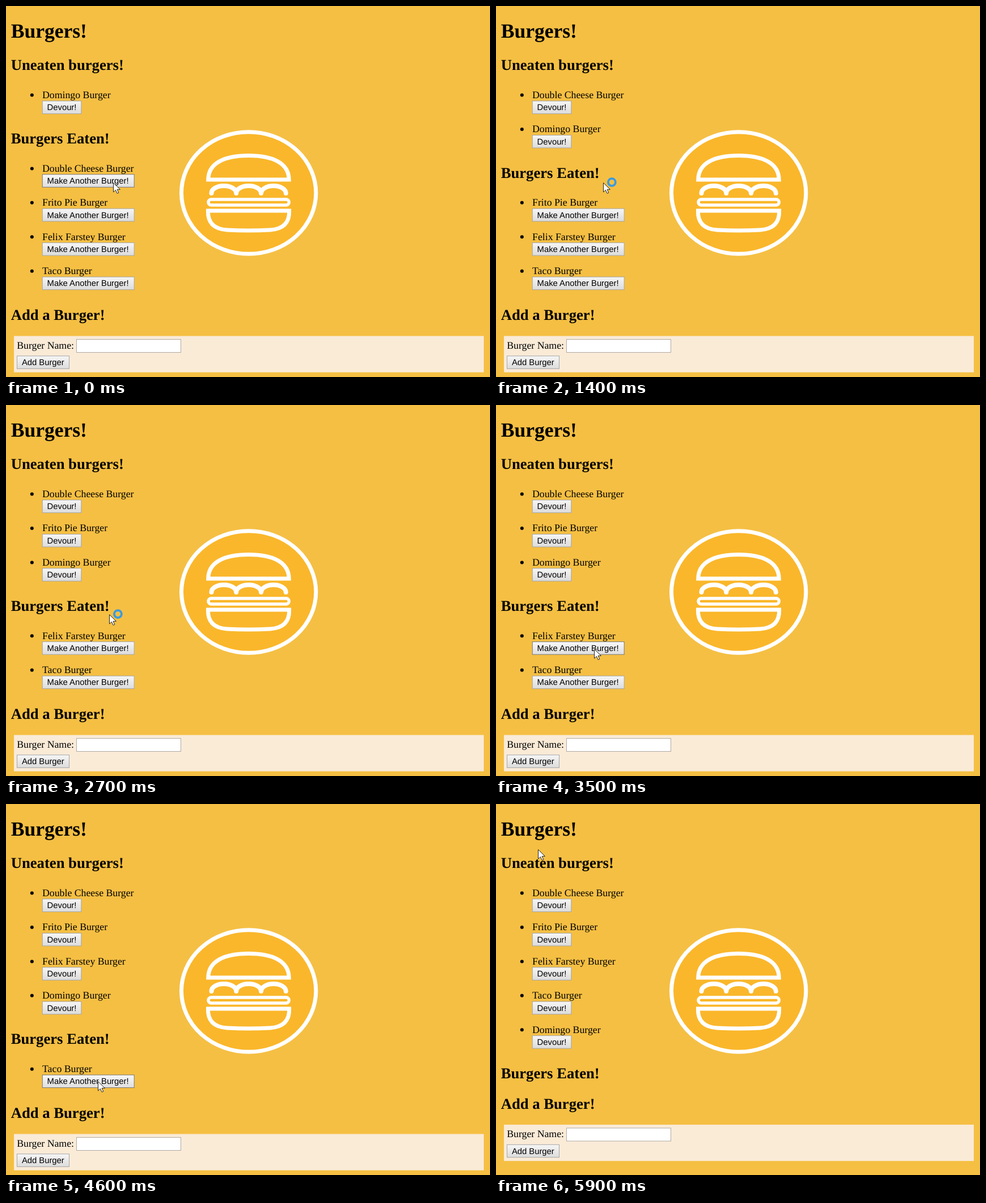
These frames come from a looping animation (854 px wide and 656 px high, 6600 ms). An HTML page:

```html
<!DOCTYPE html>
<html lang="en">
<head>
<meta charset="utf-8">
<title>Burgers!</title>
<style>
  html, body { margin: 0; width: 100%; height: 100%; overflow: hidden; background: #f5bf43; }
  svg { display: block; }
  text { font: 17.78px "Liberation Serif", "Times New Roman", serif; text-rendering: geometricPrecision; white-space: pre; }
  .h1 { font-size: 35.55px; font-weight: bold; }
  .h2 { font-size: 26.67px; font-weight: bold; }
  .label { font: 14.81px "Liberation Sans", Arial, sans-serif; }
  .icon { fill: none; stroke: #fff; stroke-width: 7; }
</style>
</head>
<body>
<svg width="854" height="656" viewBox="0 0 854 656">
  <defs>
    <linearGradient id="idle" x2="0" y2="1"><stop stop-color="#f6f6f6"/><stop offset="1" stop-color="#dcdcdc"/></linearGradient>
    <linearGradient id="hover" x2="0" y2="1"><stop stop-color="#f8f8f8"/><stop offset="1" stop-color="#dfdfdf"/></linearGradient>
    <linearGradient id="down" x2="0" y2="1"><stop stop-color="#dcdcdc"/><stop offset="1" stop-color="#f3f3f3"/></linearGradient>
  </defs>
  <rect width="854" height="656" fill="#f5bf43"/>
  <g class="icon">
    <ellipse cx="428.2" cy="330.5" rx="118.7" ry="107.8" fill="#fab72b"/>
    <path d="M356.8 307C357 278 385 264.5 428 264.5S499 278 499.3 307Z"/>
    <path d="M362.5 331a21.9 13 0 0 1 43.8 0a21.9 13 0 0 1 43.8 0a21.9 13 0 0 1 43.8 0" stroke-width="8" stroke-linecap="round" stroke-linejoin="round"/>
    <rect x="357" y="342" width="142.4" height="10" rx="5" stroke-width="5.4"/>
    <path d="M356.5 362H499.7C500.5 384 488 394.5 466 396Q428 398 390 396C368 394.5 355.7 384 356.5 362Z"/>
  </g>
  <g id="page"></g>
  <g id="cursor"></g>
</svg>
<script>
const LOOP = 6600, PITCH = 60.42, GAP = 69.4;
const eatenFirst = ["Double Cheese", "Frito Pie", "Felix Farstey", "Taco"];
const ownBurger = "Domingo";

// time, uneaten count, pointer x, y, pointer kind, state of the top eaten button
const steps = [
  [0, 1, 189, 312, "arrow", "hover"],
  [800, 1, 189, 312, "arrow", "down"],
  [900, 1, 189, 312, "arrow", "hover"],
  [1200, 1, 189, 312, "busy", "hover"],
  [1400, 2, 189, 312, "busy", "idle"],
  [1800, 2, 188, 322, "arrow", "idle"],
  [1900, 2, 185, 350, "arrow", "idle"],
  [2000, 2, 182, 370, "arrow", "hover"],
  [2100, 2, 182, 370, "arrow", "down"],
  [2200, 2, 182, 370, "arrow", "hover"],
  [2300, 2, 182, 370, "busy", "hover"],
  [2700, 3, 182, 370, "busy", "idle"],
  [2900, 3, 182, 370, "arrow", "idle"],
  [3000, 3, 181, 377, "arrow", "idle"],
  [3100, 3, 179, 392, "arrow", "idle"],
  [3200, 3, 176, 410, "arrow", "idle"],
  [3300, 3, 174, 424, "arrow", "hover"],
  [3400, 3, 173, 429, "arrow", "hover"],
  [3500, 3, 173, 431, "arrow", "hover"],
  [3800, 3, 173, 431, "arrow", "down"],
  [3900, 3, 173, 431, "arrow", "hover"],
  [4000, 4, 173, 431, "busy", "idle"],
  [4100, 4, 167, 465, "arrow", "idle"],
  [4200, 4, 162, 490, "arrow", "hover"],
  [4400, 4, 162, 490, "arrow", "down"],
  [4600, 4, 162, 490, "arrow", "hover"],
  [5000, 5, 116, 369, "beam", "idle"],
  [5100, 5, 74, 127, "arrow", "idle"],
  [5400, 5, 70, 105, "beam", "idle"],
  [5500, 5, 66, 72, "arrow", "idle"],
  [5600, 5, 65, 64, "beam", "idle"],
  [5700, 5, 66, 66, "arrow", "idle"],
  [5800, 5, 71, 75, "arrow", "idle"],
  [5900, 5, 74, 80, "arrow", "idle"]
];

const text = (x, y, str, cls = "") => `<text x="${x}" y="${y}" class="${cls}">${str}</text>`;

const box = (x, y, w, h, fill, stroke) =>
  `<rect x="${x + .5}" y="${y + .5}" width="${w - 1}" height="${h - 1}" fill="${fill}" stroke="${stroke}"/>`;

const button = (x, y, w, str, state = "idle") =>
  box(x, y, w, 23.5, `url(#${state})`, state === "idle" ? "#a6a6a6" : "#777") +
  text(x + 8.9, y + 16.9, str, "label");

const item = (y, name, btn) =>
  `<circle cx="45.8" cy="${y - 5.4}" r="3"/>` + text(64, y, name + " Burger") + btn;

function drawPage(count, state) {
  const moved = eatenFirst.slice(0, count - 1);
  const left = eatenFirst.slice(count - 1);
  const lift = left.length ? 0 : 16.5;
  let out = text(8.7, 56.3, "Burgers!", "h1") + text(8.7, 113, "Uneaten burgers!", "h2");
  [...moved, ownBurger].forEach((name, i) => {
    const y = 163 + i * PITCH;
    out += item(y, name, button(63.7, y + 4.5, 69.6, "Devour!"));
  });
  out += text(8.7, 182.8 + count * PITCH, "Burgers Eaten!", "h2");
  left.forEach((name, i) => {
    const y = 163 + GAP + (count + i) * PITCH;
    out += item(y, name, button(63.7, y + 4.5, 163, "Make Another Burger!", i ? "idle" : state));
  });
  out += `<g transform="translate(0 ${-lift})">` +
    text(8.7, 555, "Add a Burger!", "h2") +
    `<rect x="14" y="583.5" width="829" height="64.2" fill="#faebd7"/>` +
    text(19.2, 605.8, "Burger Name:") +
    box(124, 589, 185, 24, "#fff", "#b0aaa2") +
    button(19, 618.3, 93, "Add Burger") + `</g>`;
  return out;
}

function drawCursor(x, y, kind) {
  const shape = kind === "beam"
    ? `<path d="M-4-8.5H-1L0-7.5L1-8.5H4M0-7.5V7.5M-4 8.5H-1L0 7.5L1 8.5H4" fill="none" stroke="#fff" stroke-opacity=".8"/>`
    : `<path d="M.5.7V17L4.4 13.4L7.2 19.4L9.8 18.2L7.1 12.4H12.4Z" fill="#fff" stroke="#222"/>`;
  const ring = kind === "busy"
    ? `<circle cx="15.4" cy="-.4" r="6.5" fill="none" stroke="#3a9be0" stroke-width="3.8"/>` : "";
  return `<g transform="translate(${x} ${y})">${shape}${ring}</g>`;
}

const page = document.getElementById("page");
const cursor = document.getElementById("cursor");
const start = performance.now();
let shown;

function tick() {
  const t = Math.max(0, performance.now() - start) % LOOP;
  const step = steps.findLast(s => s[0] <= t);
  if (step !== shown) {
    const [, count, x, y, kind, state] = step;
    page.innerHTML = drawPage(count, state);
    cursor.innerHTML = drawCursor(x, y, kind);
    shown = step;
  }
  requestAnimationFrame(tick);
}
tick();
</script>
</body>
</html>
```
